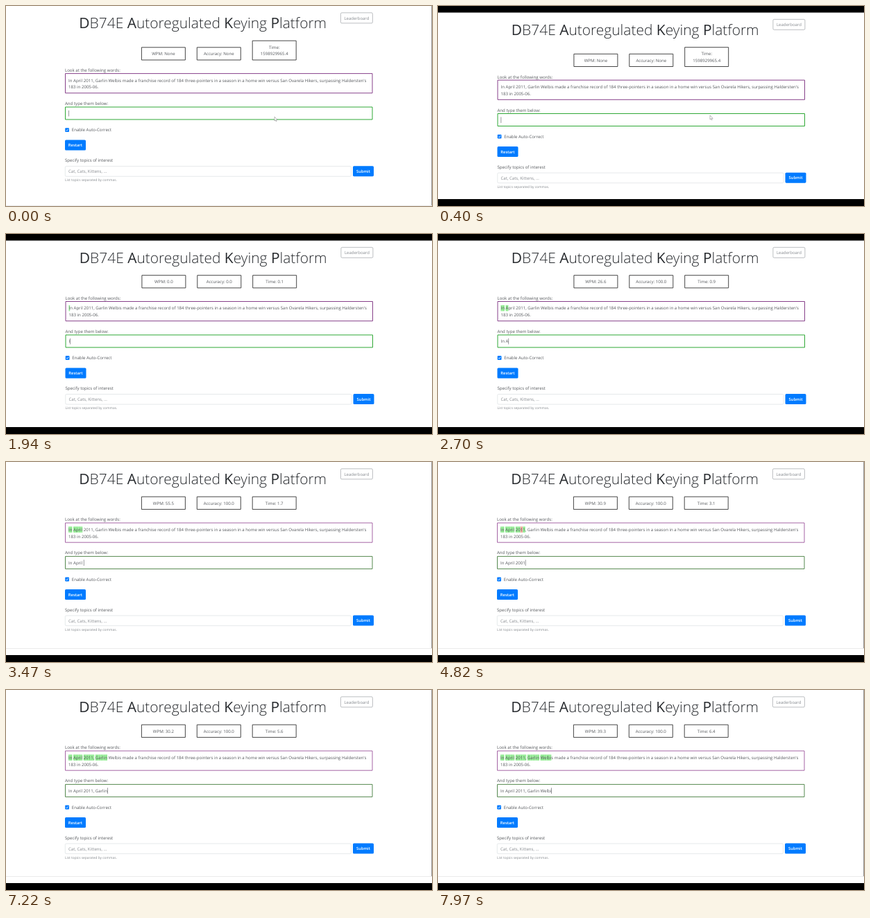
These frames come from a looping animation (614 by 289 pixels, 8 s). An HTML page with a canvas:

```html
<!DOCTYPE html>
<html lang="en">
<head>
<meta charset="utf-8">
<title>Typing test</title>
<style>
html, body { margin: 0; width: 100%; height: 100%; overflow: hidden; background: #fff; }
canvas { display: block; width: 614px; height: 289px; }
</style>
</head>
<body>
<canvas id="stage" width="614" height="289"></canvas>
<script>
const ctx = document.getElementById('stage').getContext('2d');
const LOOP = 8000;
const FAMILY = '"Open Sans", "Noto Sans", sans-serif';
const INK = '#54575b', TITLE_INK = '#26292d', GREY = '#85898e', BLUE = '#007bff';
const BODY = 6.1;
const LINE = 9.6;
const ZOOM = 4; // glyphs are laid out large, then scaled down, for smooth spacing

const PROMPT = [
  'In April 2011, Garlin Welbis made a franchise record of 184 three-pointers in a season in a home win versus San Ovarela Hikers, surpassing Haldersten\'s',
  '183 in 2005-06.'
];

// '<' is a backspace
const KEYS = 'In April 2001<<11, Garlin Welbi';
const KEY_TIMES = [
  1840, 2030, 2220, 2600, 2795, 2890, 3080, 3180, 3375, 3560, 3970, 4250, 4535,
  5020, 5210, 5490, 5680, 5980, 6070, 6260, 6540, 6830, 6930, 7120, 7215, 7410,
  7600, 7700, 7790, 7880, 7970
];
const START = KEY_TIMES[0];
const SCROLL = 2795;

// Bursts of counter refreshes: first, last, count
const BURSTS = [
  [1840, 2600, 9], [2700, 3470, 9], [3560, 3760, 3], [3970, 4630, 8], [4820, 4820, 1],
  [5020, 5490, 6], [5680, 5770, 2], [5980, 6730, 9], [6830, 7600, 9], [7700, 7970, 4]
];
// Clock time in ms against seconds on the counter
const CLOCK = [[1840, 0.01], [2700, 0.902], [3470, 1.73], [4820, 3.107], [6260, 4.504], [7970, 6.411]];

function lastTick(t) {
  const [first, last, count] = BURSTS.filter(b => b[0] <= t + 5).pop();
  if (count === 1) return first;
  const step = (last - first) / (count - 1);
  const i = Math.min(count - 1, Math.max(0, Math.floor((t - first + 5) / step)));
  return first + i * step;
}

function elapsedAt(t) {
  let i = 1;
  while (i < CLOCK.length - 1 && t > CLOCK[i][0]) i++;
  const [t0, s0] = CLOCK[i - 1], [t1, s1] = CLOCK[i];
  return s0 + (s1 - s0) * (t - t0) / (t1 - t0);
}

function typedAt(t) {
  let out = '';
  KEY_TIMES.forEach((at, i) => {
    if (at > t + 3) return;
    out = KEYS[i] === '<' ? out.slice(0, -1) : out + KEYS[i];
  });
  return out;
}

function setFont(size, weight) {
  ctx.font = `${weight} ${size * ZOOM}px ${FAMILY}`;
  if ('textRendering' in ctx) ctx.textRendering = 'geometricPrecision';
}

function widthOf(str, size = BODY, weight = 400) {
  setFont(size, weight);
  return ctx.measureText(str).width / ZOOM;
}

// y is the middle of the capitals
function text(str, x, y, { size = BODY, color = INK, align = 'left', weight = 400 } = {}) {
  ctx.save();
  ctx.translate(x, y + size * 0.357);
  ctx.scale(1 / ZOOM, 1 / ZOOM);
  setFont(size, weight);
  ctx.textAlign = align;
  ctx.fillStyle = color;
  ctx.fillText(str, 0, 0);
  ctx.restore();
}

function fill(x, y, w, h, color) {
  ctx.fillStyle = color;
  ctx.fillRect(x, y, w, h);
}

function frame(x, y, w, h, color, line = 1, radius = 0) {
  ctx.beginPath();
  ctx.roundRect(x, y, w, h, radius);
  ctx.strokeStyle = color;
  ctx.lineWidth = line;
  ctx.stroke();
}

function button(label, x, y, w, h) {
  ctx.beginPath();
  ctx.roundRect(x, y, w, h, 1.6);
  ctx.fillStyle = BLUE;
  ctx.fill();
  text(label, x + w / 2, y + h / 2, { size: 5.8, color: '#fff', align: 'center', weight: 600 });
}

function drawTitle() {
  const size = 20.95;
  const runs = ['D', 'B74E ', 'A', 'utoregulated ', 'K', 'eying ', 'P', 'latform']
    .map((str, i) => ({ str, weight: i % 2 ? 300 : 400 }));
  const widths = runs.map(r => widthOf(r.str, size, r.weight));
  let x = 283.7 - widths.reduce((a, b) => a + b) / 2;
  runs.forEach((r, i) => {
    text(r.str, x, 25, { size, weight: r.weight, color: TITLE_INK });
    x += widths[i];
  });
}

function drawStats(stats, dy) {
  stats.forEach((lines, i) => {
    const x = 195.4 + i * 79.9;
    const extra = (lines.length - 1) * LINE;
    const top = 50.2 + dy - extra;
    frame(x, top, 63, 18.2 + extra, '#333', 0.9);
    lines.forEach((str, row) => {
      text(str, x + 31.5, top + 9.2 + row * LINE, { align: 'center' });
    });
  });
}

function drawPrompt(typed, border) {
  frame(85.5, 88, 442.5, 28.2, border);
  for (let i = 0; i < typed.length; i++) {
    if (PROMPT[0][i] === ' ') continue;
    const x = 90 + widthOf(PROMPT[0].slice(0, i));
    const end = 90 + widthOf(PROMPT[0].slice(0, i + 1));
    fill(x, 93.3, end - x, 8.6, typed[i] === PROMPT[0][i] ? '#94ec94' : '#f2a9a0');
  }
  PROMPT.forEach((str, row) => text(str, 90, 97.8 + row * LINE));
}

function drawForm(typed, caret, border) {
  text('And type them below:', 85, 131.3);
  frame(85.5, 136.4, 442.5, 18, border);
  text(typed, 90, 145.8);
  if (caret) fill(90.1 + widthOf(typed), 141.3, 0.6, 8.6, INK);

  ctx.beginPath();
  ctx.roundRect(85.2, 166.6, 5.8, 5.8, 1);
  ctx.fillStyle = BLUE;
  ctx.fill();
  ctx.beginPath();
  ctx.moveTo(86.6, 169.6);
  ctx.lineTo(87.7, 170.8);
  ctx.lineTo(89.7, 168.2);
  ctx.strokeStyle = '#fff';
  ctx.lineWidth = 0.8;
  ctx.stroke();
  text('Enable Auto-Correct', 94.8, 169.6);

  button('Restart', 85, 184, 30, 15);
  text('Specify topics of interest', 85, 213.6);
  frame(85.3, 222, 412.2, 14.6, '#d6dade', 0.6, 1.6);
  text('Cat, Cats, Kittens, ...', 90, 229.4, { color: GREY });
  button('Submit', 500, 221.6, 30, 15);
  text('List topics separated by commas.', 85, 242.1, { size: 4.85, color: GREY });
}

function drawPointer(t) {
  if (t >= 1050) return;
  let x = 387, y = 160;
  if (t >= 100) {
    const p = Math.min(1, Math.max(0, (t - 400) / 650));
    const e = p * p * (3 - 2 * p);
    x = 392 + 22 * e;
    y = 158 - 36 * e;
  }
  ctx.beginPath();
  [[0, 0], [0, 6], [1.4, 4.8], [2.3, 6.8], [3.2, 6.4], [2.4, 4.5], [4.2, 4.4]]
    .forEach(([dx, dy]) => ctx.lineTo(x + dx, y + dy));
  ctx.closePath();
  ctx.fillStyle = '#fff';
  ctx.fill();
  ctx.strokeStyle = '#777';
  ctx.lineWidth = 0.5;
  ctx.stroke();
}

function drawPage(t) {
  const running = t >= START;
  let typed = '';
  let stats = [['WPM: None'], ['Accuracy: None'], ['Time:', '1598929965.4']];
  if (running) {
    const tick = lastTick(t);
    typed = typedAt(tick);
    const done = Math.max(0, typed.lastIndexOf(' '));
    const secs = elapsedAt(tick);
    stats = [
      ['WPM: ' + (done * 12 / secs).toFixed(1)],
      ['Accuracy: ' + (done ? '100.0' : '0.0')],
      ['Time: ' + secs.toFixed(1)]
    ];
  }
  const caret = running || t < 530 || (t >= 1050 && t < 1540);
  const [promptEdge, inputEdge] = t < SCROLL ? ['#87408a', '#2fa836'] : ['#a565a5', '#55894f'];
  const dy = running ? 0 : LINE;

  drawTitle();
  frame(482.4, 9.8, 46, 15, '#8d9297', 0.6, 1.6);
  text('Leaderboard', 505.4, 17.4, { size: 6, color: GREY, align: 'center' });
  drawStats(stats, dy);

  ctx.save();
  ctx.translate(0, dy);
  text('Look at the following words:', 85, 83.3);
  drawPrompt(typed, promptEdge);
  drawForm(typed, caret, inputEdge);
  ctx.restore();
}

function draw(t) {
  const barred = t >= 100 && t < SCROLL;
  fill(0, 0, 614, 289, '#fff');
  ctx.save();
  if (barred) ctx.translate(0.5, 9.5);
  drawPage(t);
  ctx.restore();
  drawPointer(t);

  if (barred) fill(0, 0, 614, 9.5, '#000');
  if (t >= 100) fill(0, 279, 614, 10, '#000');
  if (!barred) {
    const foot = t < 100 ? 288 : 269;
    fill(0, foot, 614, 1, '#ebebeb');
    fill(613, 0, 1, foot, '#999');
  }
}

function loop() {
  draw(performance.now() % LOOP);
  requestAnimationFrame(loop);
}
loop();
</script>
</body>
</html>
```
